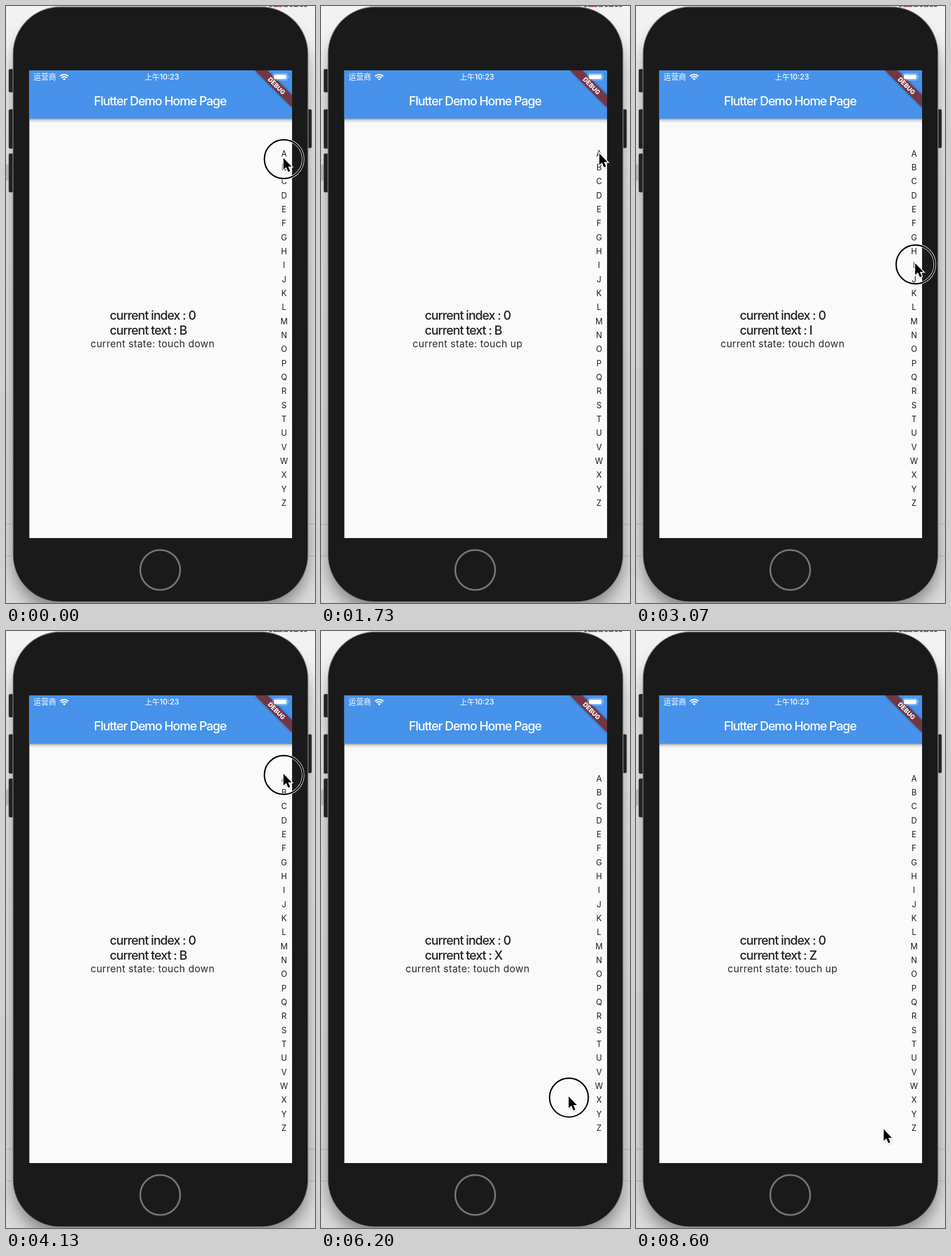
An HTML page that plays this animation: 539 by 1039 pixels, repeating every 8.74 s.

```html
<!DOCTYPE html>
<html lang="en">
<head>
<meta charset="utf-8">
<title>Index bar demo</title>
<style>
html, body { margin: 0; width: 100%; height: 100%; overflow: hidden; background: #e4e4e4; }
svg { display: block; width: 100%; height: 100%; }
text { font-family: Inter, "Noto Sans CJK SC", "Noto Sans CJK", sans-serif; }
.head { font-size: 21.5px; font-weight: 500; letter-spacing: -1.08px; fill: #212121; }
.mid { text-anchor: middle; }
</style>
</head>
<body>
<svg viewBox="0 0 539 1039" preserveAspectRatio="none">
  <defs>
    <linearGradient id="wall" x2="0" y2="1">
      <stop offset="0" stop-color="#f3f3f3"/>
      <stop offset=".3" stop-color="#e4e4e4"/>
      <stop offset="1" stop-color="#dadada"/>
    </linearGradient>
    <linearGradient id="fall" x2="0" y2="1">
      <stop offset="0" stop-color="#000" stop-opacity=".38"/>
      <stop offset=".4" stop-color="#000" stop-opacity=".12"/>
      <stop offset="1" stop-color="#000" stop-opacity="0"/>
    </linearGradient>
    <filter id="blur" x="-20%" y="-20%" width="140%" height="140%"><feGaussianBlur stdDeviation="14"/></filter>
    <filter id="soft" x="-50%" y="-50%" width="200%" height="200%"><feGaussianBlur stdDeviation="2"/></filter>
    <clipPath id="screen"><rect x="40.7" y="112" width="458.3" height="814"/></clipPath>
    <path id="arrow" d="M0 0V20.2L4.7 15.9 8.2 24.2 11.6 22.8 8.1 15H14.3Z"/>
  </defs>

  <rect width="539" height="1039" fill="url(#wall)"/>
  <path d="M0 902H539M0 957H539" stroke="#b4b4b4"/>
  <path d="M459 .7H525" stroke="#555" stroke-width="1.4" stroke-dasharray="5 2 8 3"/>
  <path d="M472 .7h7" stroke="#c33" stroke-width="1.4"/>
  <rect x="14" y="30" width="511" height="1022" rx="82" opacity=".4" filter="url(#blur)"/>
  <rect y="276" width="6" height="28" fill="#b5b5b5"/>

  <g fill="#232323" stroke="#3a3a3a" stroke-width=".6">
    <rect x="5" y="110" width="12" height="40" rx="2"/>
    <rect x="5" y="180" width="12" height="68" rx="2"/>
    <rect x="5" y="257" width="12" height="67" rx="2"/>
    <rect x="521" y="180" width="12" height="67" rx="2"/>
  </g>
  <rect x="12.2" y="1.5" width="514.6" height="1035.5" rx="82" fill="#1a1a1a" stroke="#858585" stroke-width="1.3"/>
  <circle cx="269" cy="981.5" r="34.8" fill="none" stroke="#757575" stroke-width="3"/>

  <g clip-path="url(#screen)">
    <rect x="40" y="112" width="460" height="814" fill="#fafafa"/>
    <rect x="40" y="196" width="460" height="8" fill="url(#fall)"/>
    <rect x="40" y="112" width="460" height="84" fill="#4793eb"/>
    <text x="48" y="128.3" font-size="13.2" fill="#fff">运营商</text>
    <g fill="none" stroke="#fff" stroke-width="2.1">
      <path d="M94.4 122.2a10.2 10.2 0 0 1 14.4 0M97 125a6.4 6.4 0 0 1 9.2 0"/>
      <path d="M99.2 127a3.4 3.4 0 0 1 4.8 0L101.6 129.4Z" fill="#fff" stroke="none"/>
    </g>
    <text class="mid" x="272" y="128.2" font-size="13" font-weight="500" fill="#fff">上午10:23</text>
    <text class="mid" x="268.7" y="173" font-size="21.5" font-weight="500" letter-spacing="-1.15" fill="#fff">Flutter Demo Home Page</text>
    <path d="M434.6 112L499 176.4V155.6L455.4 112Z" opacity=".5" filter="url(#soft)"/>
    <path d="M434.6 112L499 176.4V155.6L455.4 112Z" fill="#743644"/>
    <text class="mid" transform="translate(472 139) rotate(45)" y="3.9" font-size="10.8" font-weight="800" fill="#fff">DEBUG</text>
    <rect x="465.6" y="117.5" width="25.4" height="11.4" rx="3" fill="none" stroke="#fff" stroke-opacity=".55"/>
    <rect x="467.3" y="119.2" width="22" height="8" rx="1.6" fill="#fff"/>
    <path d="M492.2 121.2q2 2 0 4Z" fill="#fff" opacity=".6"/>

    <g id="letters" class="mid" font-size="14" fill="#1c1c1c"></g>
    <text class="head" x="181" y="545.5">current index : 0</text>
    <text class="head" x="181" y="572" id="label"></text>
    <text class="mid" x="255.7" y="594" id="state" font-size="17.1" letter-spacing=".35" fill="#2a2a2a"></text>
  </g>

  <g id="pointer">
    <g id="ring" fill="none">
      <circle r="33.8" stroke="#fff" stroke-width="4.2"/>
      <circle r="33.8" stroke="#000" stroke-width="2.4"/>
    </g>
    <g transform="translate(-.5 -2)">
      <use href="#arrow" x=".5" y="2" opacity=".35" filter="url(#soft)"/>
      <use href="#arrow" stroke="#fff" stroke-width="3" paint-order="stroke"/>
    </g>
  </g>
</svg>
<script>
const LOOP = 8740, STEP = 1000 / 15, LAG = 50;
const ROW = 24.34, ABC = "ABCDEFGHIJKLMNOPQRSTUVWXYZ";
const $ = id => document.getElementById(id);

// [time, value] stops, eased between neighbours
const pathX = [[0, 484.5], [1000, 484.5], [1730, 486], [2200, 487.5], [3530, 487.5],
  [4130, 484.5], [4500, 484.5], [5150, 432.5]];
const pathY = [[0, 266.5], [330, 278], [470, 278], [600, 280], [900, 280], [1730, 258.5],
  [2400, 259], [3330, 496], [3530, 496], [4150, 250], [4500, 248], [5425, 789],
  [5800, 789], [6670, 841.5], [6800, 841.5], [7330, 869]];
const presses = [[0, 850], [2200, 8000]];

function at(stops, t) {
  const i = stops.findIndex(s => s[0] > t);
  if (i < 0) return stops[stops.length - 1][1];
  if (i === 0) return stops[0][1];
  const [t0, a] = stops[i - 1], [t1, b] = stops[i];
  const u = (t - t0) / (t1 - t0);
  return a + (b - a) * u * u * (3 - 2 * u);
}

function letterAt(y) {
  const row = Math.round((y - 243.9) / ROW);
  return ABC[Math.max(0, Math.min(25, row))];
}

$("letters").innerHTML = [...ABC].map((c, i) =>
  `<text x="485" y="${(261.6 + i * ROW).toFixed(2)}">${c}</text>`).join("");

function draw(now) {
  const t = Math.floor((now % LOOP + 5) / STEP) * STEP;
  const down = presses.some(([a, b]) => t >= a && t < b);
  $("pointer").setAttribute("transform", `translate(${at(pathX, t)} ${at(pathY, t)})`);
  $("ring").setAttribute("visibility", down ? "visible" : "hidden");
  $("label").textContent = "current text : " + letterAt(at(pathY, t - LAG));
  $("state").textContent = "current state: touch " + (down ? "down" : "up");
}

const start = performance.now();
function tick() {
  draw(performance.now() - start);
  requestAnimationFrame(tick);
}
tick();
</script>
</body>
</html>
```
